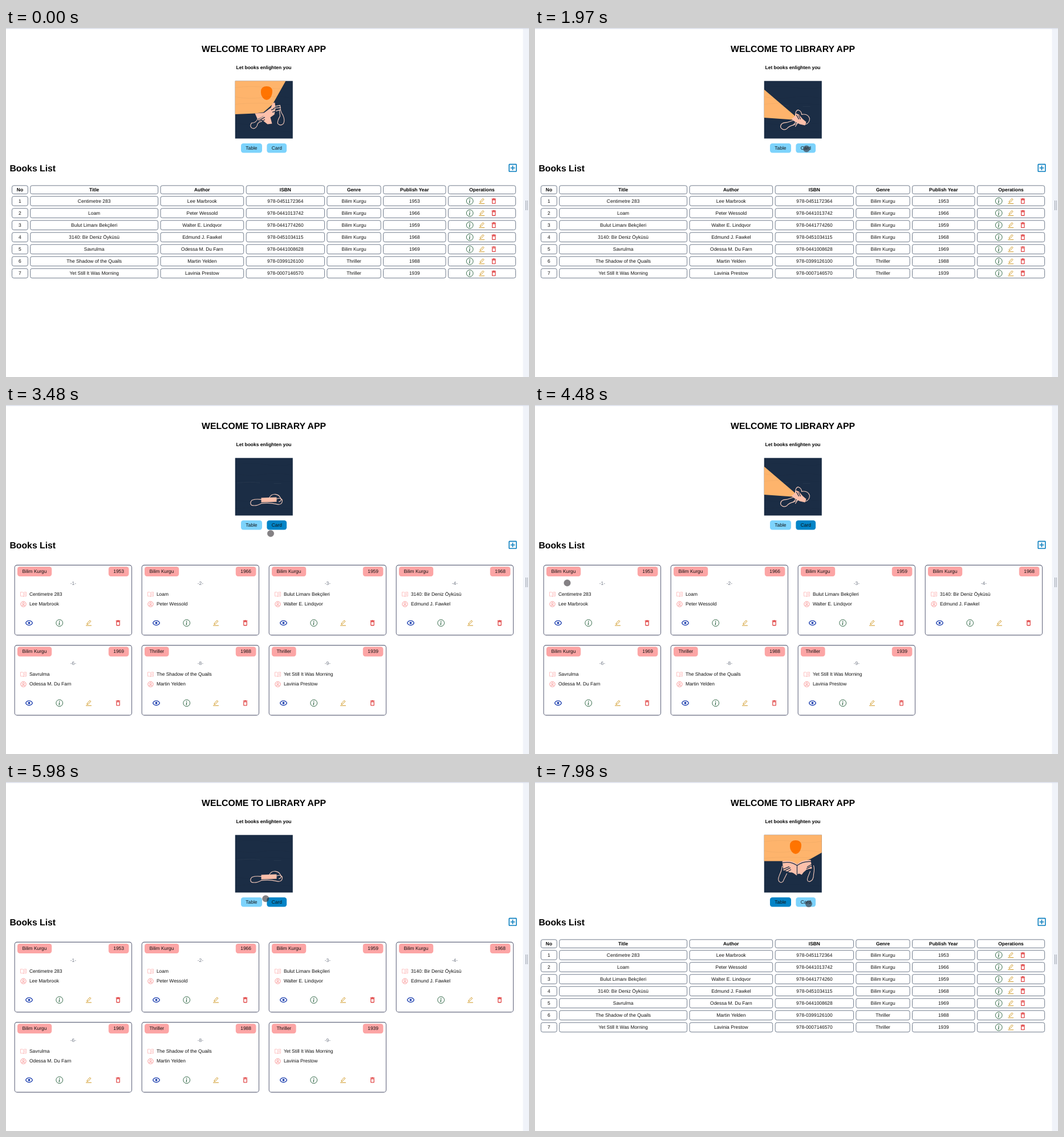
Write an HTML page that moves like this. It is 917x611 px and loops after 8000 ms.

```html
<!DOCTYPE html>
<html lang="en">
<head>
<meta charset="utf-8">
<title>Library App</title>
<style>
html, body { margin: 0; width: 100%; height: 100%; overflow: hidden; background: #fff; }
svg { display: block; width: 917px; height: 611px; }
text { font: 8.43px "Liberation Sans", Arial, sans-serif; fill: #111; text-rendering: geometricPrecision; }
.mid { text-anchor: middle; }
.bold { font-weight: bold; fill: #000; }
.big { font-size: 15.75px; }
.muted { fill: #6b7280; }
.cell { fill: #fff; stroke: #5f6b7e; stroke-width: .9; }
.card { fill: #fff; stroke: #666a80; stroke-width: 1.1; }
.badge { fill: #fca5a5; }
.btn { fill: #7dd3fc; }
.btn.on { fill: #0284c7; }
.line { fill: none; stroke: currentColor; }
.arm { fill: none; stroke: #f6cbbb; stroke-width: 1.1; stroke-linecap: round; stroke-linejoin: round; }
.finger { fill: none; stroke: #1b2d45; stroke-width: 1.2; stroke-linecap: round; }
.skin { fill: #fdc0ab; }
.light { fill: #feb46c; }
.sun { fill: #ff7400; }
.grain { fill: none; stroke: #000; stroke-width: .6; opacity: .07; }
</style>
</head>
<body>
<svg id="stage" viewBox="0 0 917 611" xmlns="http://www.w3.org/2000/svg">
  <defs>
    <g id="info" fill="#14532d">
      <circle cx="8" cy="8" r="7.45" fill="none" stroke="#14532d" stroke-width="1.1"/>
      <path d="m8.93 6.588-2.29.287-.082.38.45.083c.294.07.352.176.288.469l-.738 3.468c-.194.897.105 1.319.808 1.319.545 0 1.178-.252 1.465-.598l.088-.416c-.2.176-.492.246-.686.246-.275 0-.375-.193-.304-.533zM9 4.5a1 1 0 1 1-2 0 1 1 0 0 1 2 0"/>
    </g>
    <path id="edit" class="line" color="#ca8a04" stroke-width="1.7" d="M6.2 16.7l.8-4.2 9.1-9 3.1 3.1-9.1 9.3zM2.6 20.5h18.8"/>
    <path id="trash" fill="#dc2626" d="M6 19c0 1.1.9 2 2 2h8c1.1 0 2-.9 2-2V7H6zM8 9h8v10H8zm7.5-5l-1-1h-5l-1 1H5v2h14V4z"/>
    <g id="eye" class="line" color="#1e40af" stroke-width="2">
      <path d="M3 12C4 9.500 6.500 6 12 6s8 3.500 9 6c-1 2.500-3.500 6-9 6s-8-3.500-9-6z"/>
      <circle cx="12" cy="12" r="3" fill="#1e40af" stroke="none"/>
    </g>
    <path id="book" class="line" color="#fca5a5" stroke-width="1.3" d="M12 6.500Q10.500 4.500 8 4.500H2v14h6q3 0 4 2 1-2 4-2h6v-14h-6q-2.500 0-4 2zv14M15 8.500h4M15 11.500h4M15 14.500h4"/>
    <g id="user" class="line" color="#f98f8f" stroke-width="1.8">
      <circle cx="12" cy="12" r="9"/><circle cx="12" cy="10" r="3.200"/><path d="M6.500 18.500q1-3.500 5.500-3.500t5.500 3.500"/>
    </g>
  </defs>

  <rect width="917" height="611" fill="#fff"/>
  <rect x="906.500" width="10.500" height="611" fill="#f0f3f9"/>
  <rect width="917" height="1.600" fill="#dce0eb"/>
  <path d="M911.500 302v17M914.200 302v17" stroke="#9aa0ab" stroke-width="1"/>

  <text class="mid bold big" x="452" y="41.500">WELCOME TO LIBRARY APP</text>
  <text class="mid bold" x="452" y="72">Let books enlighten you</text>
  <text class="bold big" x="6.500" y="250.500">Books List</text>
  <path fill="#0a7fbf" transform="translate(879 235.500) scale(.79)" d="M19 3H5a2 2 0 0 0-2 2v14a2 2 0 0 0 2 2h14c1.100 0 2-.9 2-2V5c0-1.100-.9-2-2-2zm0 16H5V5h14zm-8-2h2v-4h4v-2h-4V7h-2v4H7v2h4z"/>

  <svg x="401.500" y="92.400" width="101.300" height="101.200" viewBox="0 0 101.300 101.200">
    <rect width="102" height="102" fill="#1b2d45"/>
    <path d="M68 45h13M4 44q25-2 40 0" stroke="#fff" stroke-width=".6" opacity=".07"/>
    <g id="art"></g>
    <path class="grain" d="M0 12q30-4 55 0t47-1M0 28q25 5 50 1t52 2M0 41q40-4 102 1M0 75q40 3 102-1M0 89q50-4 102 1"/>
  </svg>

  <rect id="tableBtn" class="btn" x="412" y="202" width="37" height="16.600" rx="4.200"/>
  <rect id="cardBtn" class="btn" x="457.400" y="202" width="34.700" height="16.600" rx="4.200"/>
  <text class="mid" x="430.400" y="213">Table</text>
  <text class="mid" x="474.800" y="213">Card</text>

  <g id="table"></g>
  <g id="cards"></g>
  <circle id="cursor" r="5.800" stroke-width=".8"/>
</svg>
<script>
const $ = id => document.getElementById(id);

// id, title, author, isbn, genre, year
const books = [
  [1, 'Centimetre 283', 'Lee Marbrook', '978-0451172364', 'Bilim Kurgu', 1953],
  [2, 'Loam', 'Peter Wessold', '978-0441013742', 'Bilim Kurgu', 1966],
  [3, 'Bulut Limanı Bekçileri', 'Walter E. Lindqvor', '978-0441774260', 'Bilim Kurgu', 1959],
  [4, '3140: Bir Deniz Öyküsü', 'Edmund J. Fawkel', '978-0451034115', 'Bilim Kurgu', 1968],
  [6, 'Savrulma', 'Odessa M. Du Farn', '978-0441008628', 'Bilim Kurgu', 1969],
  [8, 'The Shadow of the Quails', 'Martin Yelden', '978-0399126100', 'Thriller', 1988],
  [9, 'Yet Still It Was Morning', 'Lavinia Prestow', '978-0007146570', 'Thriller', 1939]
];

// label, left, right
const columns = [
  ['No', 10.5, 38.4], ['Title', 42.6, 266.6], ['Author', 271, 416.7], ['ISBN', 421.2, 558.6],
  ['Genre', 562.9, 657.2], ['Publish Year', 661.5, 771], ['Operations', 775.4, 893.6]
];

const rect = (x, y, w, h, r, cls) =>
  `<rect class="${cls}" x="${x}" y="${y}" width="${w}" height="${h}" rx="${r}"/>`;
const text = (x, y, s, cls = '') => `<text class="${cls}" x="${x}" y="${y}">${s}</text>`;
const icon = (id, cx, cy, size, box = 24) => {
  const k = size / box;
  return `<use href="#${id}" transform="translate(${cx - size / 2} ${cy - size / 2}) scale(${k})"/>`;
};
const tools = (xs, y) =>
  icon('info', xs[0], y, 12.6, 16) + icon('edit', xs[1], y, 12.6) + icon('trash', xs[2], y, 12.8);

function tableRow(values, top, height, cls) {
  return columns.map(([, left, right], i) =>
    rect(left, top, right - left, height, 3.2, 'cell') +
    text((left + right) / 2, top + height / 2 + 2.8, values[i] ?? '', cls)).join('');
}

function card([id, title, author, , genre, year], i) {
  const x = 15.2 + i % 4 * 223, y = 280.4 + (i > 3 ? 140.2 : 0);
  return rect(x, y, 205.3, 122.5, 4.2, 'card') +
    rect(x + 4.8, y + 2.6, genre === 'Thriller' ? 42.6 : 60.2, 17, 4.2, 'badge') +
    text(x + 13.2, y + 13.8, genre) +
    rect(x + 164.6, y + 2.6, 35.6, 17, 4.2, 'badge') +
    text(x + 182.4, y + 13.8, year, 'mid') +
    text(x + 102.7, y + 34.8, `-${id}-`, 'mid muted') +
    icon('book', x + 15.3, y + 51, 12) + text(x + 25.7, y + 53.8, title) +
    icon('user', x + 15.3, y + 68.2, 12.4) + text(x + 25.7, y + 70.8, author) +
    icon('eye', x + 25.3, y + 101.2, 15.8) +
    tools([x + 78.5, x + 129.8, x + 181.3], y + 101.2);
}

$('table').innerHTML = tableRow(columns.map(c => c[0]), 275.9, 14.6, 'mid bold') +
  books.map(([, ...info], i) => {
    const y = 303 + i * 21.08;
    return tableRow([i + 1, ...info], y - 8.3, 16.6, 'mid') + tools([813.2, 834.2, 855.3], y);
  }).join('');
$('cards').innerHTML = books.map(card).join('');

const path = (cls, d) => `<path class="${cls}" d="${d}"/>`;
const sun = (x, y) => path('sun', `M${x - 10} ${y - 4}q1-8 10-8t10 8q0 8-4 13-6 6-12 0-5-6-4-13z`);
const openBook =
  path('skin', 'M32 46Q48 44 58 51Q68 43 82 44L84 59Q72 60 66 70Q60 66 57 71Q50 65 46 66Q40 64 34 62Z') +
  path('finger', 'M33 49Q48 46 58 54Q68 46 82 47M58 53V69M34 60l10-4M36 63l10-5M39 66l8-5M75 59l8-4M76 56l7-4M74 62l8-2') +
  path('arm', 'M32 55Q31 63 27 71Q23 80 28 83Q33 85 35 78L40 68M87 54Q89 59 87 69Q87 80 80 82Q74 82 77 74L81 64');

// Stages of the book opening and closing
const poses = {
  half: path('light', 'M0 0H89L66 41 50 55 36 57 0 58.500Z') + sun(55.5, 21.5) +
    path('skin', 'M35 57L51 56 63 47 66 39 70 38 71 49 69 59 62 64 65 75 57 76 47 68 42 71 39 66Z') +
    path('finger', 'M40 67l10-5M41 70l11-6M44 73l8-5M64 51l9-4M66 55l8-3M68 48l6-4') +
    path('arm', 'M50 62L40 66Q37 74 29 74Q25 80 30 83Q36 85 39 78Q39 73 47 71M69 45L79 43M69 48L80 47M72 53L79 51M79 43Q79 53 84 60Q88 69 85 75Q80 80 75 75Q74 70 79 62L78 52'),
  wide: path('light', 'M0 0H101.500V8L75 42 57 52 34 52 0 52Z') + sun(55.5, 21.5) + openBook,
  open: path('light', 'M0 0H101.500V31L82 42 57 51 33 46H0Z') + sun(55.5, 21.5) + openBook,
  closed: path('skin', 'M46 70L73 69 73 77 46 78Z') +
    path('arm', 'M46 73Q36 72 30 74Q25 79 29 83Q37 85 46 80Q60 78 72 81Q83 84 83 74Q80 69 73 72M60 70Q64 63 71 64Q77 65 79 69Q84 75 77 77'),
  tilted: path('skin', 'M49 64Q53 60 59 62L76 68 74 81 46 76Z') +
    path('finger', 'M55 64l4 5M59 62l4 6M62 62l2 6') +
    path('arm', 'M48 68Q40 73 35 74Q28 75 29 82Q35 88 42 83Q45 79 53 78M51 63L57 55 62 59Q70 58 76 61Q79 65 78 71L74 77'),
  beam: path('light', 'M0 15L55 62 50 68 0 64.500Z'),
  beamWide: path('light', 'M0 0L6 0 57 60 50 68 0 62Z')
};
const opening =
  path('skin', 'M48 67L54 62 56 57 61 59 68 67 74 72 72 78 63 76 55 72Z') +
  path('finger', 'M57 60l4 7M61 61l3 6') +
  path('arm', 'M52 69L40 73Q29 73 29 81Q33 88 40 84Q44 79 53 77L60 73M55 61Q55 52 60 51Q66 53 66 59Q77 57 80 66Q80 74 73 76M56 72L51 78M59 74L55 80');
poses.beam += opening;
poses.beamWide += opening;

// start, pose, cursor x, cursor y, active button, pressed
const steps = [
  [0, 'half'],
  [500, 'open', 548, 272],
  [970, 'closed', 476, 211.5],
  [1460, 'tilted', 476, 211.5],
  [1970, 'beam', 476, 211.5],
  [2470, 'half', 476, 211.5, 'card', true],
  [2980, 'open', 476, 214, 'card'],
  [3480, 'closed', 464, 225, 'card'],
  [3980, 'tilted', 388, 230, 'card'],
  [4480, 'beam', 56.5, 311.5, 'card'],
  [4980, 'wide', 62, 406, 'card'],
  [5470, 'open', 55, 401, 'card'],
  [5980, 'closed', 455.3, 204.2, 'card'],
  [6480, 'tilted', 434.5, 209.5, 'table', true],
  [6970, 'beamWide', 481, 217, 'table'],
  [7480, 'wide', 480, 213.3, 'table'],
  [7980, 'open', 480, 213.3, 'table']
];

function show([, pose, x, y, active, pressed]) {
  $('art').innerHTML = poses[pose];
  $('table').style.display = active === 'card' ? 'none' : '';
  $('cards').style.display = active === 'card' ? '' : 'none';
  $('tableBtn').classList.toggle('on', active === 'table');
  $('cardBtn').classList.toggle('on', active === 'card');
  const cursor = $('cursor');
  cursor.style.display = x ? '' : 'none';
  cursor.setAttribute('transform', `translate(${x || 0} ${y || 0})`);
  cursor.setAttribute('fill', pressed ? 'rgba(14,20,60,.78)' : 'rgba(50,45,50,.6)');
  cursor.setAttribute('stroke', pressed ? 'rgba(14,20,60,.3)' : 'rgba(90,85,90,.3)');
}

const start = performance.now();
let current;
function tick() {
  const t = (performance.now() - start) % 8000;
  const step = steps.findLast(s => s[0] <= t);
  if (step !== current) show(current = step);
  requestAnimationFrame(tick);
}
tick();
</script>
</body>
</html>
```
